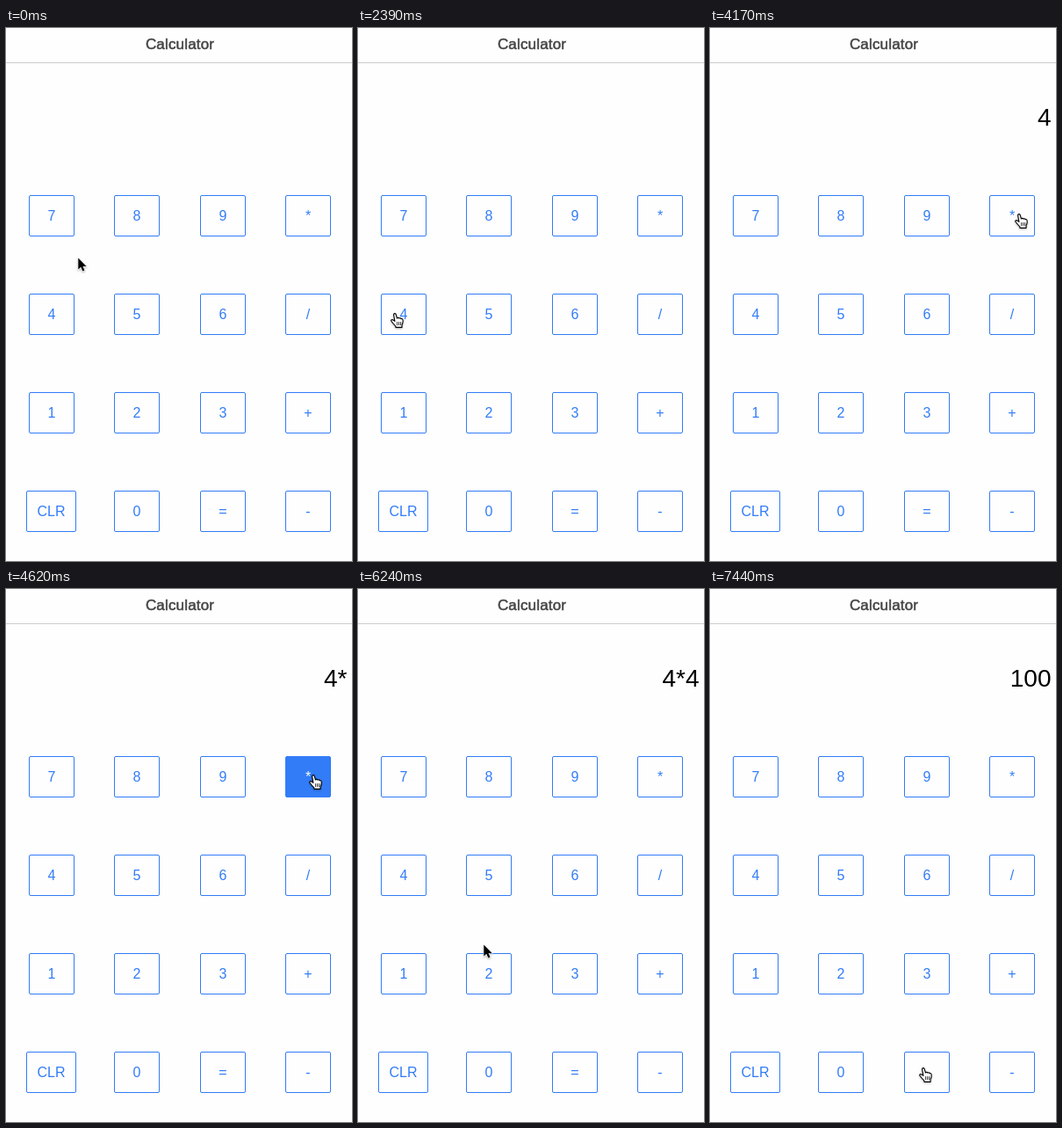
An HTML page that plays this animation: 394 by 606 pixels, repeating every 8 s.

```html
<!DOCTYPE html>
<html lang="en">
<head>
<meta charset="utf-8">
<title>Calculator</title>
<style>
  html, body { margin: 0; width: 100%; height: 100%; overflow: hidden; background: #fefefe; }
  svg { display: block; font-family: "Liberation Sans", Arial, Helvetica, sans-serif; }
  .title { font-size: 17px; letter-spacing: .17px; fill: #444; stroke: #444; stroke-width: .5px; }
  .display { font-size: 28px; fill: #000; }
  .key rect { fill: #fefefe; stroke: #327cf8; }
  .key text { font-size: 16px; fill: #327cf8; }
  .key.down rect { fill: #327cf8; }
  .key.down text, .key.blank text { fill: #fefefe; }
  #arrow, #hand { filter: drop-shadow(0 1px 1px rgba(0, 0, 0, .3)); }
</style>
</head>
<body>
<svg id="stage" width="394" height="606" viewBox="0 0 394 606">
  <text class="title" x="198" y="24" text-anchor="middle">Calculator</text>
  <rect y="39" width="394" height="1" fill="#ccc"/>
  <text class="display" id="display" x="388.5" y="111" text-anchor="end"></text>
  <g id="keys"></g>
  <g id="cursor">
    <path id="arrow" d="M.3 .6V13.6L3.3 10.8L5.3 15.4L7.5 14.4L5.5 10H9.6Z"
      fill="#000" stroke="#fff" stroke-width="1.2" paint-order="stroke"/>
    <g id="hand" stroke="#000" stroke-linejoin="round" stroke-linecap="round">
      <path fill="#fff" stroke-width="1.1" d="M3.6 1.9C3.8 .4 5.6 .2 6.2 1.6L7.4 6C8 5 9.5 5.2 9.8 6.2
        C10.5 5.4 11.8 5.8 12 6.8C12.8 6.2 14 6.8 14.1 7.9C14.4 10 14 11.8 13 13.6V16.4H6L5.8 14.8
        C4.3 13.3 2.5 11.4 .9 9.2C.4 8 1.8 7.1 3 8L4.9 9.4Z"/>
      <path fill="none" stroke-width=".8" d="M7.6 10.5V13.6M9.6 10.5V13.6M11.6 10.5V13.6"/>
    </g>
  </g>
</svg>
<script>
const LOOP = 8000;
const $ = id => document.getElementById(id);
const labels = ["7", "8", "9", "*", "4", "5", "6", "/", "1", "2", "3", "+", "CLR", "0", "=", "-"];
const columns = [26, 123, 221, 318];
const keys = {};

function add(parent, tag, attrs) {
  const node = document.createElementNS("http://www.w3.org/2000/svg", tag);
  for (const name in attrs) node.setAttribute(name, attrs[name]);
  return parent.appendChild(node);
}

labels.forEach((label, i) => {
  const wide = label === "CLR";
  const x = columns[i % 4] - (wide ? 3 : 0);
  const y = 190 + 112 * Math.floor(i / 4);
  const width = wide ? 57 : 52;
  const key = add($("keys"), "g", { class: "key" });
  add(key, "rect", { x: x + .5, y: y + .5, width: width - 1, height: 46, rx: 1.5 });
  add(key, "text", { x: x + width / 2, y: y + 29, "text-anchor": "middle" }).textContent = label;
  keys[label] = key;
});

// time, pointer shape, x, y
const moves = [
  [0, "arrow", 82, 261], [150, "arrow", 61, 290], [300, "hand", 38, 324], [590, "hand", 38, 323],
  [2390, "hand", 37, 324], [2540, "hand", 42, 328], [2690, "hand", 47, 332], [2840, "hand", 50, 334],
  [3290, "arrow", 108, 322], [3440, "arrow", 325, 248], [3590, "hand", 351, 217],
  [3740, "hand", 353, 213], [3890, "hand", 352, 212], [4040, "hand", 349, 211],
  [4170, "hand", 347, 211], [4320, "hand", 345, 211],
  [4920, "arrow", 304, 243], [5070, "arrow", 205, 286], [5220, "arrow", 102, 316],
  [5350, "hand", 51, 329], [5500, "hand", 45, 328],
  [6240, "arrow", 143, 404], [6390, "arrow", 212, 499], [6540, "hand", 235, 538],
  [6690, "hand", 238, 543], [6840, "hand", 238, 544]
];
const readout = [[0, ""], [2690, "4"], [4620, "4*"], [5800, "4*4"], [7140, "100"]];
// time, key, state
const presses = [
  [0, "", ""], [2540, "4", "down"], [2840, "", ""], [4470, "*", "down"], [4770, "", ""],
  [5650, "4", "down"], [5950, "", ""], [6990, "=", "down"], [7440, "=", "blank"]
];

const at = (steps, t) => steps.reduce((found, step) => step[0] <= t ? step : found);

function draw(t) {
  const [, shape, x, y] = at(moves, t);
  $("cursor").setAttribute("transform", `translate(${x} ${y})`);
  $("arrow").style.display = shape === "arrow" ? "" : "none";
  $("hand").style.display = shape === "hand" ? "" : "none";
  $("display").textContent = at(readout, t)[1];
  const [, active, state] = at(presses, t);
  for (const label of labels)
    keys[label].setAttribute("class", label === active ? "key " + state : "key");
}

const start = performance.now();
function tick() {
  draw((performance.now() - start) % LOOP);
  requestAnimationFrame(tick);
}
tick();
</script>
</body>
</html>
```
